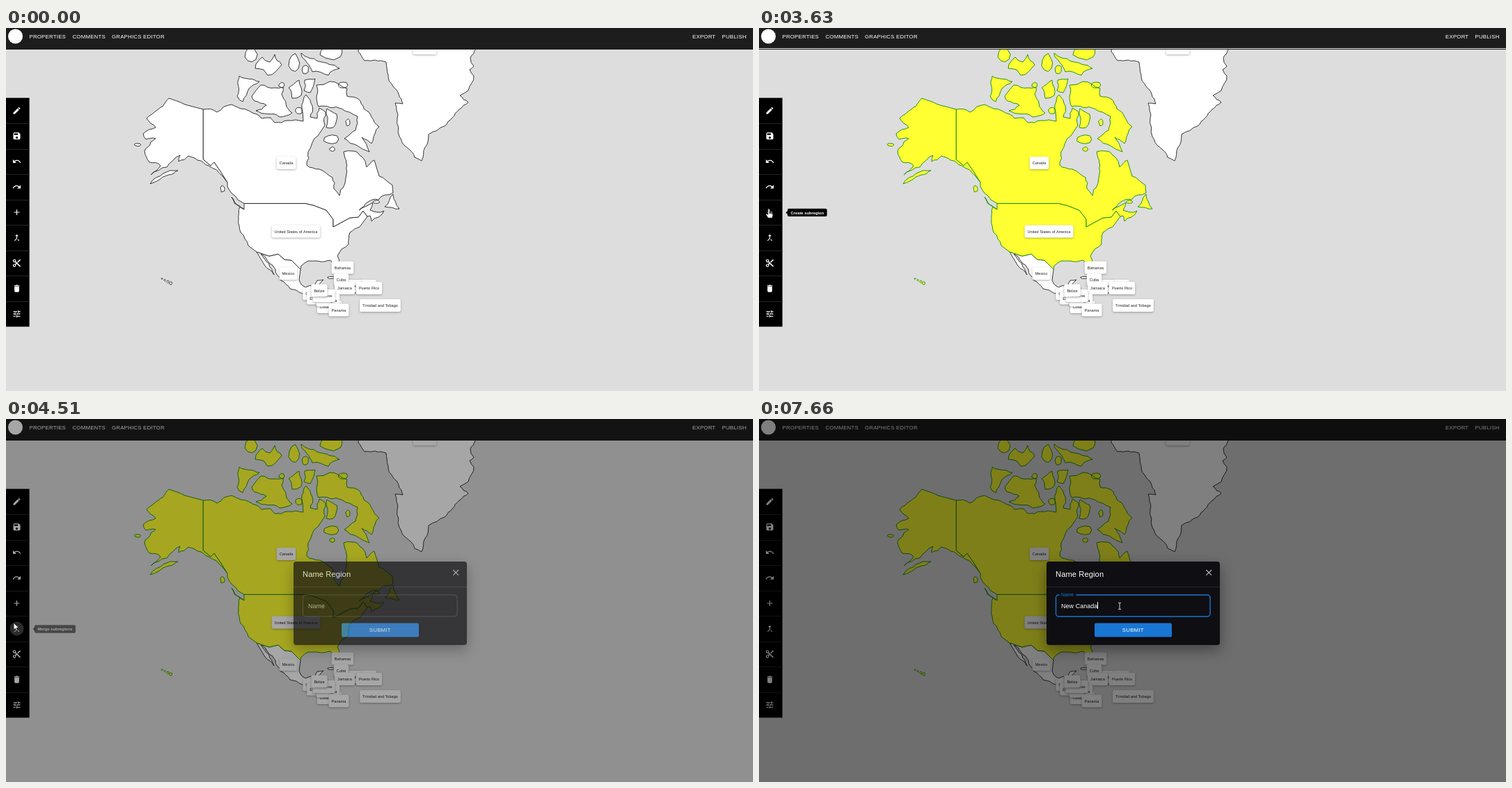
An HTML page with a canvas that plays this animation: 1073x522 px, repeating every 8000 ms.

```html
<!DOCTYPE html>
<html lang="en">
<head>
<meta charset="utf-8">
<title>Map editor</title>
<style>
html, body { margin: 0; width: 100%; height: 100%; overflow: hidden; background: #ddd; }
canvas { display: block; }
</style>
</head>
<body>
<canvas id="stage" width="1073" height="522"></canvas>
<script>
const W = 1073, H = 522, LOOP = 8000;
const SANS = '"Liberation Sans", Arial, sans-serif';
const POPUP_FONT = '"Open Sans", "Noto Sans", sans-serif';
const main = document.getElementById('stage').getContext('2d');
const layer = Object.assign(document.createElement('canvas'), { width: W, height: H }).getContext('2d');
let g = main;

// ---- timing helpers ----
const clamp = p => Math.max(0, Math.min(1, p));
const ramp = (t, start, length) => clamp((t - start) / length);
const between = (t, a, b) => t >= a && t < b;
const mix = (a, b, p) => a + (b - a) * p;
const smooth = p => p * p * (3 - 2 * p);
const swift = p => 1 - (1 - p * p) ** 4;

// ---- map: a few key points per coast, roughened between them ----
let seed = 11;
const random = () => (seed = seed * 16807 % 2147483647) / 2147483647;
const pts = s => s.trim().split(/\s+/).map(p => p.split(',').map(Number));
const flip = list => [...list].reverse();

function rough([ax, ay], [bx, by]) {
  const dx = bx - ax, dy = by - ay, length = Math.hypot(dx, dy);
  if (length < 7) return [[bx, by]];
  const k = (random() - 0.5) * 0.26 * Math.min(1, 20 / length);
  const mid = [(ax + bx) / 2 - dy * k, (ay + by) / 2 + dx * k];
  return [...rough([ax, ay], mid), ...rough(mid, [bx, by])];
}

const coast = s => pts(s).reduce((line, p) => line.length ? [...line, ...rough(line.at(-1), p)] : [p], []);

function addShape(region, points) {
  const path = new Path2D();
  points.forEach(([x, y]) => path.lineTo(x, y));
  path.closePath();
  region.addPath(path);
}

// Strings are coastlines, arrays are borders shared by two countries.
const land = (region, ...parts) =>
  addShape(region, parts.flatMap(p => typeof p === 'string' ? coast(p) : p));

function islet(region, x, y, rx, ry) {
  const corners = Array.from({ length: 9 }, (_, i) => {
    const a = i / 9 * 2 * Math.PI, r = 0.8 + 0.35 * random();
    return [x + rx * r * Math.cos(a), y + ry * r * Math.sin(a)];
  });
  addShape(region, corners);
}

const canada = new Path2D(), usa = new Path2D(), mexico = new Path2D(), greenland = new Path2D();
const northBorder = pts('342,252.3 430,252.3 442,255 460,262 470,275 470,286 494,273 506,272 513,263 519,271');
const panhandle = pts('283.3,117 283.3,189 294,198 299,193 308,206 318,222');
const southBorder = pts('360,322 378,328 391,325 400,333 410,334 423,347');

land(canada,
  `283.3,117 303,121 324,110 337,116 360,124 367,130 380,129 386,136 405,133 427,134
   425,110 431,96 440,112 437,128 447,130 450,115 459,121 458,140`,
  '448,155 434,178 432,197 450,203 469,215 471,231 479,241 489,210 485,178 498,177 511,185 518,200 529,190',
  '536,213 555,226 556,237 535,247 520,250 507,262 527,251 523,262 543,263 525,278 523,270',
  flip(northBorder), '333,247 318,228', flip(panhandle));
land(canada, `446,82 465,77 490,87 490,98 506,102 525,128 536,142 530,152 525,166 511,157 522,178
  486,159 502,147 505,127 482,116 449,113 446,82`);
land(canada, '353,98 366,82 386,86 398,85 396,95 411,122 393,128 359,119 374,111 357,105 353,98');
land(canada, '335,69 364,77 349,87 340,106 332,98 335,69');
land(canada, '424,36 435,43 449,48 479,58 463,68 440,63 424,36');
land(canada, '359,52 368,42 379,49 386,38 396,53 376,68 370,60 358,58 359,52');
land(canada, '406,86 421,75 424,97 411,101 406,86');
land(canada, '429,75 444,73 437,93 428,90 429,75');
land(canada, '461,116 475,124 470,143 460,143 461,116');
land(canada, '544,257 556,239 565,260 544,257');
land(canada, '324,243 341,260 328,252 324,243');
islet(canada, 352, 38, 9, 11);
islet(canada, 414, 50, 8, 12);
islet(canada, 430, 60, 5, 6);
islet(canada, 467, 36, 19, 9);
islet(canada, 396, 82, 4, 4);
islet(canada, 421, 119, 5, 5);
islet(canada, 483, 82, 7, 5);
islet(canada, 491, 136, 3, 5);
islet(canada, 467, 160, 10, 7);
islet(canada, 469, 174, 4, 3);
islet(canada, 532, 250, 5, 2);
islet(canada, 311, 231, 3, 5);

land(usa, northBorder, '508,286 494,294 492,311 476,328 478,350 466,334 447,335 434,335 424,342',
  flip(southBorder), '348,313 337,294 336,257 342,261');
land(usa, panhandle, `311,213 291,198 275,190 262,184 248,192 250,183 231,200 208,211 222,198 206,193
  199,177 204,171 215,159 201,160 197,152 215,143 202,130 213,121 234,101 257,110`);
land(usa, '207,224 226,209 247,205 234,211 217,220 207,224');
islet(usa, 189, 168, 5, 2);
for (let i = 0; i < 4; i++) islet(usa, 224 + 4.2 * i, 360.5 + 2.2 * i, 1 + 0.3 * i, 0.7 + 0.5 * i);

land(mexico, southBorder, '421,363 430,373 443,371 447,363 456,362 442,385 408,375 395,363 387,347 366,325 385,355 372,342');
islet(mexico, 468, 359, 6, 1.5);
land(greenland, `506,34 505,5 680,5 674,31 667,43 672,55 666,60 672,69 664,90 652,97 664,107 651,117 630,141
  607,153 597,191 587,186 565,156 562,130 559,108 570,109 556,84 546,49 515,47 506,34`);

// ---- drawing helpers ----
function text(str, x, cy, size, { color = '#fff', align = 'left', weight = 400, gap = 0, font = SANS } = {}) {
  g.font = `${weight} ${size}px ${font}`;
  g.letterSpacing = gap + 'px';
  g.textAlign = align;
  g.fillStyle = color;
  g.fillText(str, x, cy + size * 0.36);
  return g.measureText(str).width;
}

function box(x, y, w, h, r, fill, shadow) {
  g.save();
  if (shadow) [g.shadowColor, g.shadowBlur, g.shadowOffsetY] = shadow;
  g.fillStyle = fill;
  g.beginPath();
  g.roundRect(x, y, w, h, r);
  g.fill();
  g.restore();
}

function triangle(x, y, dx, dy, fill) {
  g.fillStyle = fill;
  g.fill(new Path2D(`M${x} ${y}l${dx} ${dy}${dx === 3 ? 'v-6' : 'h-10'}z`));
}

function faded(alpha, draw) {
  if (alpha <= 0) return;
  g.save();
  g.globalAlpha *= alpha;
  draw();
  g.restore();
}

function region(path, picked) {
  g.fillStyle = picked ? '#ffff32' : '#fff';
  g.strokeStyle = picked ? '#118a11' : '#222';
  g.lineWidth = 0.9;
  g.lineJoin = 'round';
  g.fill(path);
  g.stroke(path);
}

function label(name, cx, cy) {
  g.font = `5.6px ${SANS}`;
  g.letterSpacing = '0px';
  const w = g.measureText(name).width + 8;
  box(cx - w / 2, cy - 9, w, 18, 2, '#fff', ['rgba(0,0,0,.32)', 3, 1]);
  text(name, cx, cy, 5.6, { color: '#222', align: 'center' });
}

const labels = [
  ['Greenland', 601.5, 29], ['Canada', 402.5, 194], ['United States of America', 416.5, 292.5],
  ['Mexico', 405.5, 353], ['Bahamas', 483.5, 344.5], ['Dominican Republic', 503, 371], ['Haiti', 501, 371],
  ['Cuba', 481.5, 362], ['Jamaica', 486.5, 374], ['Puerto Rico', 521.5, 374],
  ['Guatemala', 444, 382], ['Costa Rica', 464.5, 401], ['El Salvador', 450.5, 388.5], ['Nicaragua', 462.5, 391.5],
  ['Honduras', 456.5, 385], ['Belize', 450, 377.5], ['Panama', 478, 405.5], ['Trinidad and Tobago', 537.5, 399]
];

// ---- toolbar ----
const TOP = 100.5, ROW = 36.55;
const rowY = i => TOP + ROW * (i + 0.5);
const undo = 'M12.5 8c-2.6 0-5 1-6.9 2.6L2 7v9h9l-3.6-3.6c4-3.6 10.7-2 12.7 3.6l2.4-.8C21 11 17.2 8 12.5 8z';
const icons = [
  'M3 17.3V21h3.7L17.8 10 14 6.2zM15 5.2L17.6 2.8 21.2 6.4 18.8 9z',
  'M17 3H5L3 5v14l2 2h14l2-2V7zM12 19a3 3 0 1 1 0-6 3 3 0 1 1 0 6zM15 9H5V5h10z',
  undo, undo,
  'M19 13h-6v6h-2v-6H5v-2h6V5h2v6h6z',
  'M17 20.4L18.4 19 15 15.6 13.6 17zM7.5 8H11v5.6L5.6 19 7 20.4l6-6V8h3.5L12 3.5z',
  'M9.6 7.6A4 4 0 1 0 7.6 9.6L10 12l-2.4 2.4a4 4 0 1 0 2 2L12 14l7 7h3v-1zM6 8a2 2 0 1 1 0-4 2 2 0 1 1 0 4zM6 20a2 2 0 1 1 0-4 2 2 0 1 1 0 4zM19 3l-6 6 2 2 7-7V3z',
  'M6 19l2 2h8l2-2V7H6zM19 4h-3.5l-1-1h-5l-1 1H5v2h14z',
  'M3 17v2h6v-2zM3 5v2h10V5zM13 21v-2h8v-2h-8v-2h-2v6zM7 9v2H3v2h4v2h2V9zM21 13v-2H11v2zM15 9h2V7h4V5h-4V3h-2z'
].map(d => new Path2D(d));

function toolbar(t) {
  box(0, TOP, 33.6, ROW * 9, 0, '#000');
  icons.forEach((icon, i) => {
    if (i) box(0, Math.round(TOP + ROW * i), 33.6, 1, 0, '#252525');
    if (i === 5) faded(ramp(t, 4440, 60) * (1 - ramp(t, 4600, 300)), () => box(5.5, 291.5, 20, 20, 10, '#444'));
    g.save();
    g.translate(15.5, rowY(i));
    g.scale(i === 3 ? -0.559 : 0.559, 0.559);
    g.translate(-12, -12);
    g.fillStyle = '#fff';
    g.fill(icon, 'evenodd');
    g.restore();
  });
}

const tips = { 2: 'Undo', 3: 'Redo', 4: 'Create subregion', 5: 'Merge subregions' };

function hoveredRow(t) {
  const [x, y] = pointerAt(t);
  return x < 34 && t < 4450 ? Math.floor((y - TOP) / ROW) : -1;
}

// A tip fades with the share of the last moments spent on its button.
function tooltip(row, t) {
  const steps = 6;
  let hits = 0;
  for (let i = 0; i < steps; i++) hits += hoveredRow(t - i * 25) === row;
  faded(hits / steps, () => {
    const y = rowY(row) + 0.5;
    g.font = `700 5.8px ${SANS}`;
    g.letterSpacing = '0px';
    box(41, y - 5.8, g.measureText(tips[row]).width + 9, 11.4, 2, '#000');
    triangle(38.5, y, 3, 3, '#000');
    text(tips[row], 45.5, y, 5.8, { weight: 700 });
  });
}

function header(t) {
  box(0, 0, W, 31, 0, '#1d1d1d');
  if (between(t, 760, 4000)) box(0, 29, W, 1, 0, '#e4e4e4');
  box(3, 1.5, 21, 21, 10.5, '#fff');
  const menu = { PROPERTIES: 33.5, COMMENTS: 95.5, 'GRAPHICS EDITOR': 152, EXPORT: 986, PUBLISH: 1028.5 };
  for (const name in menu) text(name, menu[name], 11.9, 7.83, { gap: 0.22 });
}

// ---- dialog ----
const FOCUS = 5100, BLINK = 530, FIRST_KEY = 6330, MISMATCH = 7030;
const PAPER = '#0f0e12', BLUE = '#1976d2';
const typed = 'New Canada';
const keyTime = i => i < 3 ? FIRST_KEY + 200 * i : i < 4 ? 6830 : MISMATCH + 126 * (i - 4);

function dialog(t) {
  const focused = t >= FOCUS, rise = smooth(ramp(t, FOCUS, 200));
  box(413, 205, 249, 120, 4, PAPER, ['rgba(0,0,0,.4)', 20, 7]);
  text('Name Region', 426, 223, 11.18, { gap: 0.08 });
  box(413, 241, 249, 1, 0, '#29282c');
  g.strokeStyle = '#bbb';
  g.lineWidth = 1.1;
  g.stroke(new Path2D('M642.3 217l7.7 7.7m0-7.7l-7.7 7.7'));

  g.strokeStyle = focused ? BLUE : '#47464a';
  g.lineWidth = focused ? 1.4 : 0.8;
  g.beginPath();
  g.roundRect(426.5, 253, 221.5, 31, 4);
  g.stroke();
  if (rise) box(431.5, 251, 24 * rise, 4, 0, PAPER);
  text('Name', 434, mix(268.3, 252.8, rise), mix(8.94, 6.7, rise), { color: focused ? BLUE : '#bbb', gap: 0.08 });

  const count = [...typed].filter((_, i) => t >= keyTime(i)).length;
  const w = text(typed.slice(0, count), 434, 268.3, 8.94, { gap: 0.08 });
  const blinkOff = Math.floor((t - FOCUS) / BLINK) % 2 === 1 && t < FIRST_KEY;
  if (focused && !blinkOff) box(Math.round(434 + w), 263, 1, 10, 0, '#fff');

  box(482, 293.5, 111, 20, 2, BLUE, ['rgba(0,0,0,.4)', 3, 1]);
  text('SUBMIT', 537.3, 303.5, 7.83, { align: 'center', gap: 0.22 });
}

function suggestions(items, w) {
  const fill = '#292a2e';
  box(482, 290, w, items.length * 20.2 + 4, 2, fill, ['rgba(0,0,0,.5)', 4, 1]);
  triangle(493, 286, 5, 4.5, fill);
  items.forEach((s, i) => text(s, 488.3, 302 + i * 20.2, 7, { font: POPUP_FONT }));
}

// ---- pointer ----
const hand = new Path2D('M-1.2 1Q0-.8 1.2 1V5.2L5 6Q6.2 6.4 6 8V10.5L5 13.6H-.8L-4 8.8Q-4.2 7-2.6 7.4L-1.2 8.8Z');
const arrow = new Path2D('M0 0V10.4L2.4 8.2 4 11.8 5.6 11 4.1 7.6H7.4Z');
const beam = new Path2D('M-2 .5H-.5L0 1 .5.5H2M0 1V9M-2 9.5H-.5L0 9 .5 9.5H2');
const knuckles = new Path2D('M1.2 5V7.5M2.8 5.6V7.7M4.4 6V8');

// start, end, and the place reached
const stops = [
  [0, 220, 388, 192], [760, 1450, 382, 268], [1820, 2300, 13, 177], [2300, 2600, 14, 199],
  [2630, 3430, 14, 259], [3570, 4310, 11, 293], [4540, 5060, 518, 264]
];

const pointerAt = t => stops.reduce(([x, y], [a, b, toX, toY]) => {
  const p = smooth(ramp(t, a, b - a));
  return [mix(x, toX, p), mix(y, toY, p)];
}, [1072, 535]);

function pointer(t) {
  if (t < 30) return;
  const [x, y] = pointerAt(t);
  const modal = t >= 4410;
  const overLand = [canada, usa, mexico, greenland].some(r => g.isPointInPath(r, x, y));
  g.save();
  g.translate(x, y);
  if (modal && x > 426 && y > 253 && y < 284) {
    g.strokeStyle = '#ddd';
    g.lineWidth = 1;
    g.stroke(beam);
  } else {
    const icon = !modal && (x < 34 || overLand) ? hand : arrow;
    g.fillStyle = '#fff';
    g.strokeStyle = '#111';
    g.lineWidth = 0.9;
    g.fill(icon);
    g.stroke(icon);
    if (icon === hand) g.stroke(knuckles);
  }
  g.restore();
}

function draw(t) {
  g = main;
  box(0, 0, W, H, 0, '#ddd');
  region(greenland, false);
  region(mexico, false);
  region(usa, t >= 1680);
  region(canada, t >= 760);
  const dim = ramp(t, 1250, 200) * (1 - ramp(t, 1820, 200));
  for (const l of labels) faded(l[0].startsWith('United') ? 1 - 0.72 * dim : 1, () => label(...l));
  header(t);
  toolbar(t);

  const open = swift(ramp(t, 4415, 190));
  if (open > 0) {
    faded(open, () => box(0, 0, W, H, 0, 'rgba(0,0,0,.5)'));
    g = layer;
    g.clearRect(0, 0, W, H);
    dialog(t);
    g = main;
    faded(open, () => g.drawImage(layer.canvas, 0, 0));
  }
  for (const row in tips) tooltip(+row, t);
  if (between(t, 5160, FIRST_KEY)) suggestions(['Mexico', 'fwefwe', 'Simplified', 'gh', 'Test#1', 'Test#2'], 54);
  else if (t >= FIRST_KEY) faded(1 - ramp(t, MISMATCH, 100), () => suggestions(['New North America'], 80));
  pointer(t);
}

const start = performance.now();
function tick() {
  draw((performance.now() - start) % LOOP);
  requestAnimationFrame(tick);
}
tick();
</script>
</body>
</html>
```
